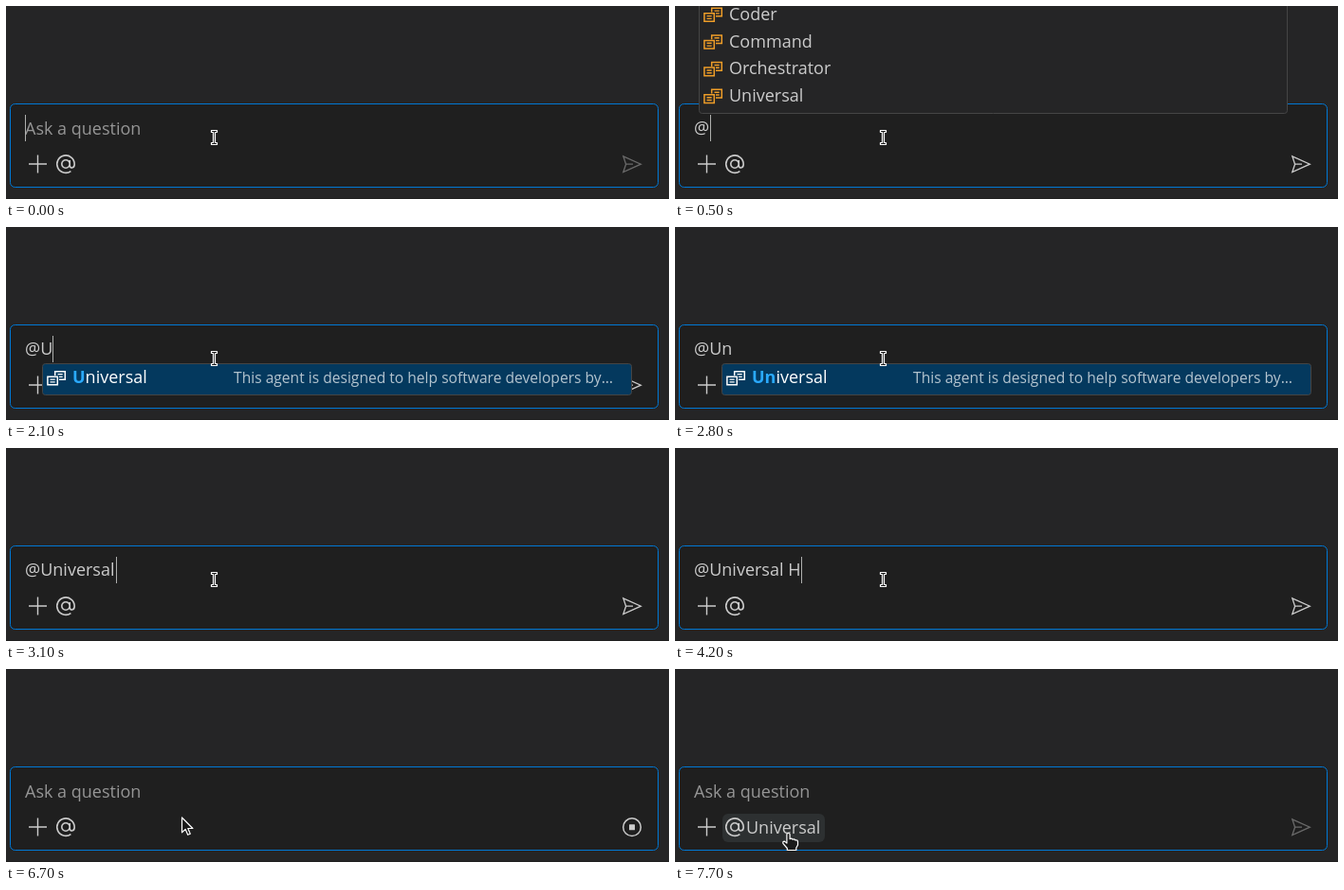
Recreate the animation shown at these times as an HTML page with a canvas. Size 699x204 px, loop 8 s.

```html
<!DOCTYPE html>
<html lang="en">
<head>
<meta charset="utf-8">
<title>Agent mention in a chat box</title>
<style>
html, body { margin: 0; width: 100%; height: 100%; overflow: hidden; background: #252526; }
canvas { display: block; width: 699px; height: 204px; }
</style>
</head>
<body>
<canvas id="stage"></canvas>
<script>
const W = 699, H = 204, LOOP = 8000;
const cv = document.getElementById('stage');
const dpr = window.devicePixelRatio || 1;
cv.width = W * dpr;
cv.height = H * dpr;
const c = cv.getContext('2d');
const FAMILY = '"Open Sans", "Noto Sans", sans-serif';
const FG = '#cccccc';

// [time, text, caret x]
const typing = [
  [0, '', 20], [500, '@', 37], [2100, '@U', 49], [2300, '@Un', 61],
  [3100, '@Universal', 116], [3800, '@Universal ', 120],
  [4200, '@Universal H', 133], [4400, '@Universal Hi', 138], [5200, '', 20]
];
// [time, x, y, shape]
const pointer = [
  [0, 219.5, 139, 'beam'], [6300, 217.5, 144, 'beam'],
  [6500, 206, 150, 'arrow'], [6600, 191, 155, 'arrow'], [6700, 185.5, 157, 'arrow'],
  [7400, 175, 162, 'arrow'], [7500, 150, 169, 'hand'],
  [7600, 129, 172, 'hand'], [7700, 119.5, 173.5, 'hand']
];
const at = (list, t) => list.filter(s => s[0] <= t).pop();

function text(s, x, y, color, size = 18, weight = 400) {
  c.font = `${weight} ${size}px ${FAMILY}`;
  c.fillStyle = color;
  c.fillText(s, x, y);
  return c.measureText(s).width;
}

function box(x, y, w, h, r, fill, stroke) {
  c.beginPath();
  c.roundRect(x, y, w, h, r);
  if (fill) { c.fillStyle = fill; c.fill(); }
  if (stroke) { c.strokeStyle = stroke; c.lineWidth = 1; c.stroke(); }
}

function line(d, color, width, x = 0, y = 0) {
  c.save();
  c.translate(x, y);
  c.strokeStyle = color;
  c.lineWidth = width;
  c.stroke(new Path2D(d));
  c.restore();
}

function agentIcon(x, y, color) {
  line('M8.7 6V1.7H19.3V10.3H13M.9 7.2H11.3V15.8H.9Z', color, 1.5, x, y);
  line('M11.5 4.6H16.7M13 7.4H16.7M3.5 10.1H8.7M3.5 12.9H8.7', color, 1.4, x, y);
}

function mention() {
  line('M67.2 163V168.2C67.2 172 72.2 172 72.2 167.2A9.2 9.2 0 1 0 68.4 174.6' +
       'M67.2 167A4.2 4.2 0 1 1 58.8 167A4.2 4.2 0 1 1 67.2 167', FG, 1.6);
}

function send(color) {
  line('M650.8 158.8L669.3 167.2L650.8 175.6L653.6 167.2ZM653.6 167.2H661', color, 1.3);
}

function stop() {
  line('M669.3 167.2A9.3 9.3 0 1 1 650.7 167.2A9.3 9.3 0 1 1 669.3 167.2', FG, 1.5);
  box(657, 164.2, 6, 6, 0.5, FG);
}

function agentList() {
  box(25.5, -4.5, 620, 118, 3, '#252526', '#454545');
  ['Coder', 'Command', 'Orchestrator', 'Universal'].forEach((name, i) => {
    const y = 15 + i * 28.7;
    agentIcon(30, y - 14.5, '#ee9d28');
    text(name, 57, y, FG);
  });
}

function suggestion(x, typed) {
  box(x + 0.5, 144.5, 621, 33, 3, '#04395e', '#454545');
  agentIcon(x + 5, 151, '#ffffff');
  const w = text(typed, x + 32, 165, '#2aaaff', 18, 700);
  text('Universal'.slice(typed.length), x + 32 + w, 165, '#ffffff');
  text('This agent is designed to help software developers by…', x + 202, 165, '#b4c4cf', 15.6);
}

const shapes = {
  beam: 'M-3 -7.5H3V-5.5H1V5.5H3V7.5H-3V5.5H-1V-5.5H-3Z',
  arrow: 'M0 0V15.8L3.7 12.4L6.2 18.3L8.8 17.2L6.3 11.5H11.4Z',
  hand: 'M-1.6 1Q0 -1 1.6 1V6.2Q3.2 5 4.5 6.7Q6.2 5.8 7.3 7.4Q9.8 6.8 10 9.3' +
        'V12.5L8.3 15.5V18H-1.2V16L-5.6 10.8Q-6.2 8.6 -4 8.6L-1.6 10.6Z'
};

function drawPointer(x, y, shape) {
  const p = new Path2D(shapes[shape]);
  c.save();
  c.translate(x, y);
  c.lineJoin = 'round';
  c.fillStyle = '#1a1a1a';
  c.fill(p);
  c.strokeStyle = '#ffffff';
  c.lineWidth = 1.2;
  c.stroke(p);
  c.restore();
}

function draw(t) {
  const [since, value, caret] = at(typing, t);
  const [, px, py, shape] = at(pointer, t);
  const busy = t >= 5200 && t < 7100;
  const answered = t >= 7100;

  c.setTransform(dpr, 0, 0, dpr, 0, 0);
  c.fillStyle = '#252526';
  c.fillRect(0, 0, W, H);
  c.fillStyle = '#1f1f1f';
  c.fillRect(0, 203, W, 1);
  box(4.5, 103.5, 683, 88, 5, '#1f1f1f', '#0078d4');

  if (value) text(value, 20, 135, FG);
  else text('Ask a question', 20, 136, '#969696');
  if (Math.floor((t - since) / 500) % 2 === 0) {
    c.fillStyle = '#aeafad';
    c.fillRect(caret, 115, 1, 28);
  }

  line('M33.5 157.5V176.5M24 167H43', FG, 1.4);
  if (shape === 'hand') box(50, 153, 108, 30, 6, '#2d3031');
  mention();
  if (answered) text('Universal', 75, 174, FG);
  if (busy) stop();
  else send(value ? FG : '#6a6a6a');

  if (value === '@') agentList();
  if (value === '@U') suggestion(38, 'U');
  if (value === '@Un') suggestion(49, 'Un');
  drawPointer(px, py, shape);
}

const start = performance.now();
function tick() {
  draw((performance.now() - start) % LOOP);
  requestAnimationFrame(tick);
}
tick();
</script>
</body>
</html>
```
